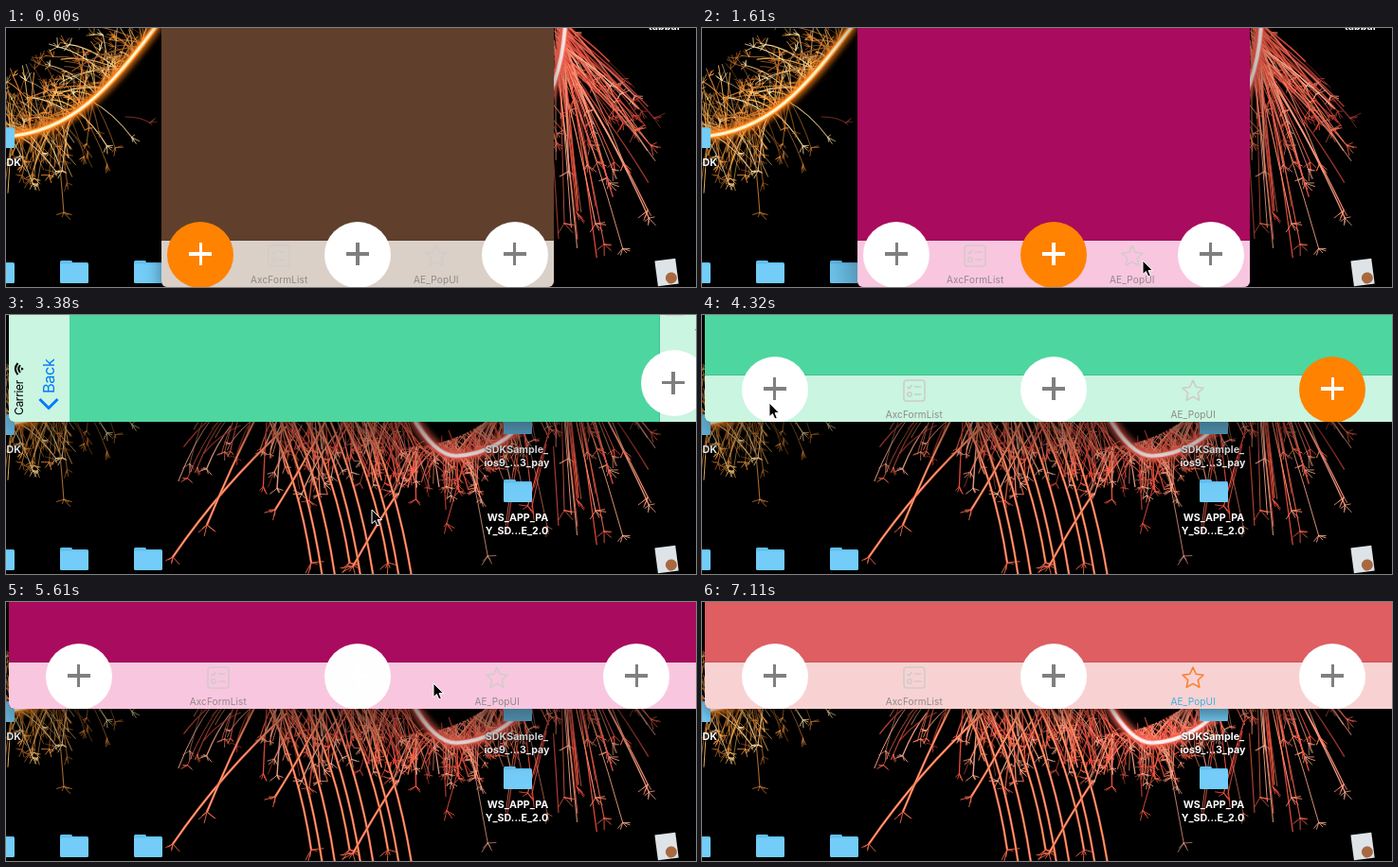
Animation of 728x274 px, one loop 7210 ms. Source, as an HTML page with a canvas:

```html
<!DOCTYPE html>
<html lang="en">
<head>
<meta charset="utf-8">
<title>Tab bar demo</title>
<style>
  html, body { margin: 0; width: 100%; height: 100%; overflow: hidden; background: #000; }
  body { position: relative; font-family: Inter, Roboto, sans-serif; }
  #desk { position: absolute; left: 0; top: 0; display: block; }
  #win { position: absolute; overflow: hidden; border-radius: 6px; background: #000; }
  #view { position: absolute; left: 50%; top: 50%; overflow: hidden; }
  #nav { position: absolute; left: 0; top: 0; width: 100%; }
  #status { position: absolute; left: 7px; top: 3px; font-size: 12px; line-height: 16px; letter-spacing: -.35px; color: #000; white-space: nowrap; }
  #status svg { position: absolute; left: 42px; top: 2px; }
  #back { position: absolute; left: 0; bottom: 0; height: 44px; color: #007aff; }
  #back svg { position: absolute; left: 12px; top: 11px; }
  #back span { position: absolute; left: 30px; top: 11px; font-size: 16.5px; line-height: 22px; letter-spacing: -.5px; }
  #bar { position: absolute; left: 0; bottom: 0; width: 100%; height: 49px; }
  #bar::before { content: ""; position: absolute; left: 0; top: -1px; width: 100%; height: 1px; background: rgba(0,0,0,.1); }
  .tab { position: absolute; top: 0; width: 0; height: 49px; }
  .disc { position: absolute; left: -35px; top: -20px; width: 70px; height: 70px; border-radius: 50%; }
  .disc::before, .disc::after { content: ""; position: absolute; background: currentColor; }
  .disc::before { left: 23px; top: 32.2px; width: 24px; height: 3.6px; }
  .disc::after { left: 33.2px; top: 22px; width: 3.6px; height: 24px; }
  .icon { position: absolute; left: -13px; top: 3px; fill: none; stroke-width: 1.6; stroke-linejoin: round; }
  .label { position: absolute; left: -50px; width: 100px; top: 35px; text-align: center; font-size: 10px; line-height: 12px; letter-spacing: .15px; }
  #cursor { position: absolute; left: 0; top: 0; overflow: visible; }
</style>
</head>
<body>
<canvas id="desk" width="728" height="274"></canvas>
<div id="win">
  <div id="view">
    <div id="nav">
      <div id="status">Carrier
        <svg width="14" height="12" fill="none" stroke="#000" stroke-width="2">
          <path d="M1 4.5Q7 -.7 13 4.5M3.2 7Q7 3.6 10.8 7"/><path d="M5.2 8.6Q7 7 8.8 8.6L7 10.6Z" fill="#000" stroke="none"/>
        </svg>
      </div>
      <div id="back">
        <svg width="14" height="22" fill="none" stroke="#007aff" stroke-width="3"><path d="M12 1.5L2.5 11L12 20.5"/></svg>
        <span>Back</span>
      </div>
    </div>
    <div id="bar"></div>
  </div>
</div>
<svg id="cursor" width="14" height="20">
  <path d="M0 0V14.6L3.4 11.5L5.8 17L8.3 15.9L6 10.6H10.5Z" fill="#000" stroke="#fff" stroke-width="1"/>
</svg>
<script>
const LOOP = 7210, FADE = 240;
const ROTATED = 3380, SPIN_FROM = 3415, SPIN_TO = 3740;
const $ = id => document.getElementById(id);
const clamp = v => Math.max(0, Math.min(1, v));
const mix = (a, b, k) => a + (b - a) * k;
const smooth = k => k * k * (3 - 2 * k);

// ---------- desktop ----------
const g = $('desk').getContext('2d');
let seed = 11;
const rnd = (a = 0, b = 1) => {
  seed = (seed * 1664525 + 1013904223) >>> 0;
  return a + (b - a) * seed / 4294967296;
};
const pick = list => list[Math.floor(rnd(0, list.length))];
const AMBER = ['#ffc060', '#f5963a', '#c8742c', '#ffe0a0', '#9c5a24'];
const RED = ['#ff6a50', '#ee513e', '#ff8d70', '#c8443a', '#ffab8c'];

function line(path, color, width) {
  g.strokeStyle = color;
  g.lineWidth = width;
  g.stroke(new Path2D(path));
}

function fork(x, y, size, color, heading) {
  for (let i = 0; i < 5; i++) {
    const a = heading + rnd(-1.5, 1.5), r = size * rnd(.4, 1.1);
    line(`M${x} ${y}l${Math.cos(a) * r} ${Math.sin(a) * r}`, color, .9);
  }
}

function spark(x, y, deg, len, color, width, bend = .1) {
  const a = deg * Math.PI / 180, dx = Math.cos(a) * len, dy = Math.sin(a) * len, sag = len * bend;
  g.globalAlpha = rnd(.6, 1);
  line(`M${x} ${y}q${dx * .55} ${dy * .55 - sag} ${dx} ${dy + sag}`, color, width);
  if (rnd() < .55) fork(x + dx, y + dy + sag, mix(6, 12, clamp(len / 140)), color, a);
  g.globalAlpha = 1;
}

// a thick bright trail between two points, bowed by `bow`
function trail(x, y, x2, y2, bow) {
  const path = `M${x} ${y}Q${mix(x, x2, .5) + bow} ${mix(y, y2, .45)} ${x2} ${y2}`;
  line(path, '#e0583e', 2.4);
  line(path, '#ffa878', 1.1);
  fork(x2, y2, 13, '#f06a4c', Math.atan2(y2 - y, x2 - x));
}

function glow(path, layers, blur) {
  g.shadowColor = layers[0][0];
  g.shadowBlur = blur;
  for (const [color, width] of layers) line(path, color, width);
  g.shadowBlur = 0;
}

function folder(x, y) {
  g.fillStyle = '#62bfee';
  g.beginPath();
  g.roundRect(x - 15, y - 12, 13, 8, 1.5);
  g.roundRect(x - 15, y - 10, 30, 10, 1.5);
  g.fill();
  g.fillStyle = '#73cdf8';
  g.beginPath();
  g.roundRect(x - 15, y - 8.5, 30, 20.5, 1.5);
  g.fill();
}

function caption(text, x, y, align = 'center') {
  g.font = '700 10.7px Inter, Roboto, sans-serif';
  g.textAlign = align;
  g.fillStyle = '#fff';
  g.shadowColor = '#000';
  g.shadowBlur = 3;
  g.shadowOffsetY = 1;
  g.fillText(text, x, y);
  g.shadowBlur = g.shadowOffsetY = 0;
}

function drawAmber() {
  const arcY = u => 115 - 115 * u ** 1.9;
  for (let i = 0; i < 180; i++) {
    const u = rnd() ** 1.3;
    spark(160 * u, arcY(u), rnd(165, 300), rnd(15, 80), pick(AMBER), rnd(.5, 1.3));
  }
  for (let i = 0; i < 60; i++) {
    const u = rnd(0, .6);
    spark(160 * u, arcY(u), rnd(35, 125), rnd(12, 60), pick(AMBER), rnd(.6, 1.2));
  }
  spark(53, 112, 84, 76, '#c87c38', 1.1);
  spark(5, 125, 98, 70, '#c87c38', 1.1);
  spark(126, 94, 8, 26, '#b8483a', 1.1);
  glow('M-4 115C70 112 110 62 160 -4', [['#ff8420', 6], ['#ffb850', 4.2], ['#fff4cc', 2.6]], 8);
}

function drawRed() {
  // side tufts and the dense crown
  for (let i = 0; i < 16; i++) spark(rnd(215, 265), rnd(88, 120), rnd(105, 150), rnd(30, 72), pick(RED), rnd(.8, 1.4));
  for (let i = 0; i < 130; i++) spark(rnd(275, 425), rnd(85, 125), rnd(40, 125), rnd(20, 75), pick(RED), rnd(.8, 1.6));
  for (let i = 0; i < 190; i++) {
    const u = rnd(), x = mix(425, 590, u);
    spark(x, mix(140, 30, u ** 2), rnd(30, 140), rnd(12, 58), pick(RED), rnd(.8, 1.5));
  }
  // falling streaks
  for (let i = 0; i < 16; i++) spark(rnd(420, 600), rnd(115, 145), rnd(65, 110), rnd(50, 110), pick(RED), rnd(.8, 1.3), .03);
  for (let i = 0; i < 90; i++) {
    const deg = rnd(35, 90);
    spark(rnd(578, 590), rnd(-10, 35), deg, (10 + deg * 2.9) * rnd(.3, 1) ** 1.4, pick(RED), rnd(.8, 1.6), .05);
  }
  // thick trails, bowed outwards
  for (let i = 0; i < 9; i++) trail(272 + i * 13, 100, 322 + i * 13.5, i % 3 ? 290 : 262, 12);
  trail(296, 118, 176, 256, -8);
  trail(262, 112, 212, 222, 0);
  trail(338, 110, 284, 206, 6);
  trail(412, 190, 366, 266, 0);
  glow('M428 106Q452 149 475 149C535 147 585 85 590 -4', [['#ff6454', 6], ['#ffb8ac', 4.8], ['#fff2f0', 3.2]], 8);
}

function drawDesk() {
  g.fillRect(0, 0, 728, 274);
  g.lineCap = 'round';
  drawAmber();
  drawRed();

  [[-6, 115], [-6, 258], [72, 258], [150, 258], [540, 114], [540, 186]].forEach(p => folder(...p));
  caption('SDK', 16, 146, 'right');
  caption('SDKSample_', 539, 146);
  caption('ios9_...3_pay', 539, 160);
  caption('WS_APP_PA', 540, 218);
  caption('Y_SD...E_2.0', 539, 232);
  caption('tabbar', 695, 2);
  g.save();
  g.translate(697, 258);
  g.rotate(-.13);
  g.fillStyle = '#dde3e6';
  g.fillRect(-11, -13, 22, 27);
  g.fillStyle = '#a8683f';
  g.beginPath();
  g.arc(4, 7, 6, 0, 7);
  g.fill();
  g.restore();
}

// ---------- phone ----------
const star = Array.from({ length: 10 }, (_, i) => {
  const r = i % 2 ? 5.6 : 11.6, a = i * Math.PI / 5;
  return `${13 + r * Math.sin(a)},${13.8 - r * Math.cos(a)}`;
}).join(' ');
const ICONS = {
  1: '<rect x="2" y="2" width="22" height="22" rx="3"/><path d="M5.5 9L7.5 11L10.5 7M13 9H20.5M13 17H20.5"/><circle cx="8" cy="17" r="2.2"/>',
  3: `<polygon points="${star}"/>`
};
const NAMES = { 1: 'AxcFormList', 3: 'AE_PopUI' };
const PAGE = {
  0: ['#60402c', '#dad0c8'],
  2: ['#a90b5e', '#f9c6df'],
  3: ['#de5e62', '#f8d2d3'],
  4: ['#4dd6a0', '#c9f5e1']
};
const TAPS = [[-999, 0], [800, 0], [1210, 2], [1790, 3], [2550, 4], [4550, 0], [5610, 2], [5890, 3]];
const PATH = [
  [60, 330, 280], [740, 207, 236], [800, 207, 236], [980, 386, 246], [1300, 386, 246], [1610, 465, 246],
  [1790, 465, 246], [2070, 534, 238], [2490, 534, 238], [2550, 493, 219], [2910, 386, 206], [3920, 386, 206],
  [4320, 71, 93], [5140, 71, 93], [5540, 380, 88], [5610, 451, 86], [5830, 514, 84], [5950, 514, 84], [6590, 590, 285]
];

const tabs = [0, 1, 2, 3, 4].map(i => {
  const el = document.createElement('div');
  el.className = 'tab';
  el.style.left = 10 + 20 * i + '%';
  el.innerHTML = ICONS[i]
    ? `<svg class="icon" width="26" height="26">${ICONS[i]}</svg><div class="label">${NAMES[i]}</div>`
    : '<div class="disc"></div>';
  $('bar').append(el);
  return el;
});

const blend = (a, b, k) => `rgb(${a.map((v, i) => Math.round(mix(v, b[i], k)))})`;

function paintTabs(t) {
  const [when, active] = TAPS.filter(tap => tap[0] <= t).pop();
  const k = clamp((t - when) / FADE);
  const [page, bar] = PAGE[active];
  $('view').style.background = page;
  $('bar').style.background = $('nav').style.background = bar;
  tabs.forEach((el, i) => {
    const on = i === active, part = el.firstChild;
    if (ICONS[i]) {
      part.style.stroke = blend([209, 204, 201], [250, 128, 50], on ? k : 0);
      el.lastChild.style.color = on ? '#38b0e4' : '#8e8888';
    } else {
      part.style.background = blend([255, 255, 255], [255, 130, 0], on ? k : 0);
      part.style.color = on ? '#fff' : '#7f7f7f';
    }
  });
}

function place(el, w, h) {
  el.style.width = w + 'px';
  el.style.height = h + 'px';
}

function paintPhone(t) {
  const wide = t >= ROTATED, win = $('win'), view = $('view');
  const w = wide ? 736 : 414, h = wide ? 414 : 736;
  place(win, w, h);
  win.style.left = 371 - w / 2 + 'px';
  win.style.top = -94 - h / 2 + 'px';
  win.style.boxShadow = t >= 60 && t < 7110 ? '0 20px 50px rgba(0,0,0,.55)' : '0 6px 18px rgba(0,0,0,.45)';
  const k = smooth(clamp((t - SPIN_FROM) / (SPIN_TO - SPIN_FROM)));
  place(view, mix(414, 736, k), mix(736, 414, k));
  view.style.transform = `translate(-50%,-50%) rotate(${wide ? -90 * (1 - k) : 0}deg)`;
  $('nav').style.height = mix(64, 44, k) + 'px';
  $('status').style.opacity = 1 - k;
}

function paintCursor(t) {
  let i = PATH.findIndex(p => p[0] > t);
  if (i < 0) i = PATH.length;
  const a = PATH[Math.max(0, i - 1)], b = PATH[Math.min(i, PATH.length - 1)];
  const k = b[0] > a[0] ? smooth(clamp((t - a[0]) / (b[0] - a[0]))) : 0;
  $('cursor').style.transform = `translate(${mix(a[1], b[1], k)}px,${mix(a[2], b[2], k)}px)`;
}

const start = performance.now();
function frame() {
  const t = (performance.now() - start) % LOOP;
  paintTabs(t);
  paintPhone(t);
  paintCursor(t);
  requestAnimationFrame(frame);
}

drawDesk();
frame();
</script>
</body>
</html>
```
